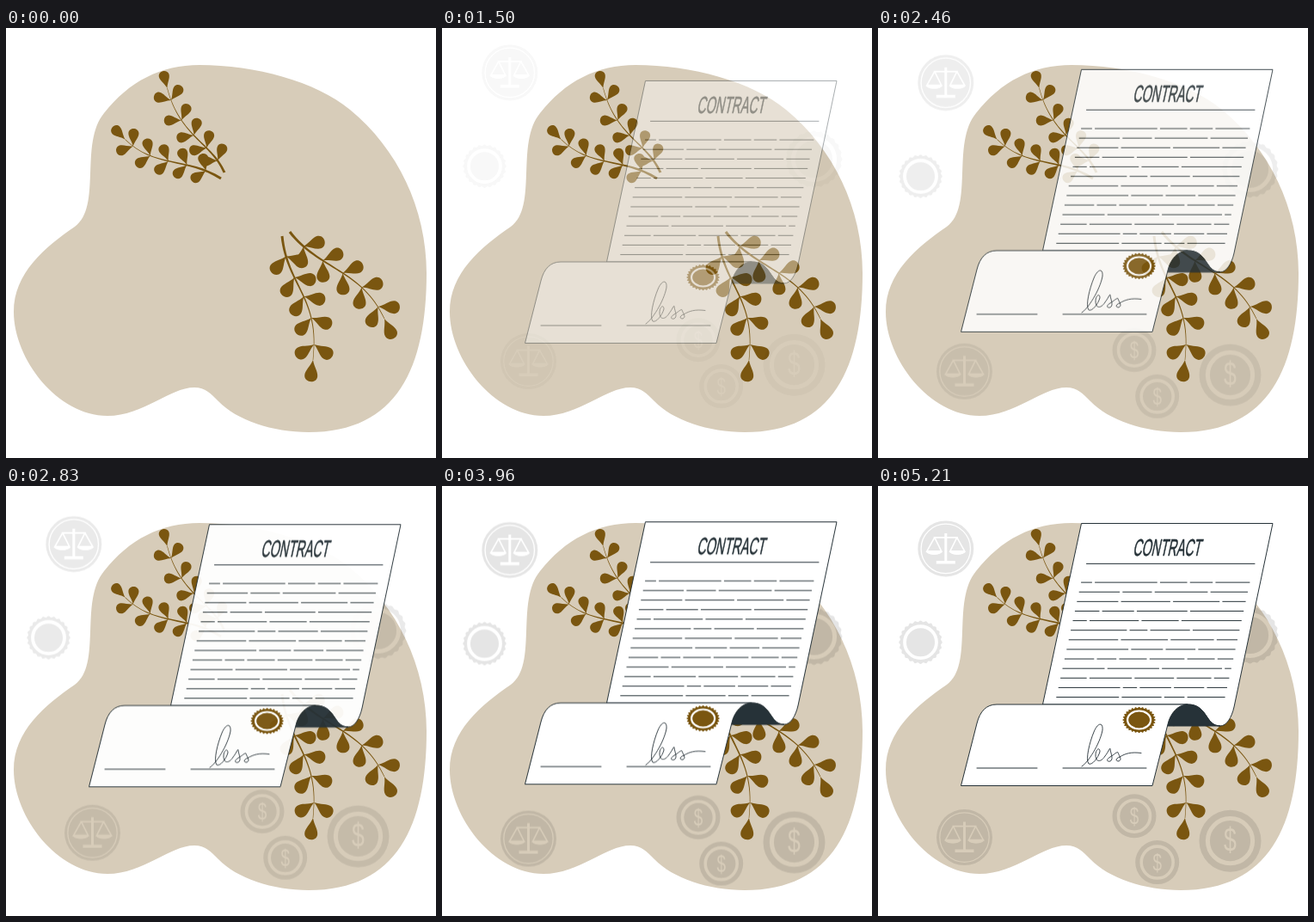
An HTML page that plays this animation: 500 by 500 pixels, repeating every 5290 ms.

```html
<!DOCTYPE html>
<html lang="en">
<head>
<meta charset="utf-8">
<title>Contract</title>
<style>
html, body { margin: 0; width: 100%; height: 100%; overflow: hidden; background: #fff; }
svg { display: block; width: 100%; height: 100%; }
.ink { fill: none; stroke: #263238; stroke-linecap: round; stroke-linejoin: round; }
.sheet { fill: #fff; stroke: #263238; stroke-linejoin: round; }
.gold { fill: #7a5610; }
text { font-family: "Liberation Sans", Arial, sans-serif; }
</style>
</head>
<body>
<svg viewBox="0 0 500 500">
  <defs id="masks"></defs>
  <path fill="#d7ccb9" d="M225 43C290 43 360 62 400 95C455 140 489 210 489 285C489 395 455 470 352 470C310 470 268 456 247 434C238 425 232 418 219 418C190 418 160 451 118 451C60 451 9 385 9 330C9 285 45 255 80 231C112 208 85 134 114 99C143 62 180 43 225 43Z"/>
  <g id="plants" class="gold"></g>
  <g id="icons" opacity="0"></g>
  <g id="paper" opacity="0">
    <path class="sheet" d="M236.5 43.5H459L414 257C411 270 405 279 398 279C380 279 384 254 360 254H191.5Z"/>
    <path fill="#263238" stroke="#263238" d="M336 279C340 264 349 254 360 254C384 254 380 279 398 279Z"/>
    <path class="sheet" d="M96.5 348.5L115 276C118.5 262 126 254 138 254H360C349 254 340 264 337 277L319 348.5Z"/>
    <text transform="translate(296 81.3) skewX(-12) scale(.518 1)" font-size="27.5" fill="#263238" stroke="#263238" stroke-width=".6">CONTRACT</text>
    <path class="ink" d="M242.5 90.4H438M115 328H185M215 328H312"/>
    <path id="lines" class="ink"/>
    <path class="ink" stroke-width=".9" d="M237 326C244 322 258 300 261 284C262 275 256 274 251 286C246 298 241 318 245 323C249 325 256 316 258 309C258 303 253 306 253 313C253 321 259 322 264 314C268 309 270 303 270 306C271 312 274 318 270 320C266 321 265 318 270 315C275 312 279 308 279 310C281 315 284 318 280 320C276 320 276 317 281 315C288 311 294 309 306 310.5"/>
    <g transform="translate(303.6 272)">
      <path id="stamp" class="gold" transform="scale(1 .79)"/>
      <ellipse rx="13.5" ry="10.5" fill="none" stroke="#fff" stroke-width="2.2"/>
    </g>
  </g>
</svg>
<script>
const $ = id => document.getElementById(id);

function add(parent, tag, attrs) {
  const el = document.createElementNS("http://www.w3.org/2000/svg", tag);
  for (const k in attrs) el.setAttribute(k, attrs[k]);
  parent.append(el);
  return el;
}

// Sprig: tapered Bezier stem, pairs of leaves around its tangent, one leaf at the tip
const LEAF = "M0 0C.3-.08.5-.3.74-.295C1.08-.27 1.08.27.74.295C.5.3.3.08 0 0Z";

function sprig(size, a, b, c, d) {
  const mix = (p, q, t) => [p[0] + (q[0] - p[0]) * t, p[1] + (q[1] - p[1]) * t];
  const leaf = (t, spread) => {
    const ab = mix(a, b, t), bc = mix(b, c, t), cd = mix(c, d, t);
    const p = mix(ab, bc, t), q = mix(bc, cd, t);
    const turn = Math.atan2(q[1] - p[1], q[0] - p[0]) * 180 / Math.PI + spread;
    add($("plants"), "path", { d: LEAF, transform: `translate(${mix(p, q, t)}) rotate(${turn}) scale(${size})` });
  };
  const len = Math.hypot(b[0] - a[0], b[1] - a[1]);
  const side = (p, w) => [p[0] - (b[1] - a[1]) / len * w, p[1] + (b[0] - a[0]) / len * w];
  add($("plants"), "path", {
    d: `M${side(a, 1.5)}C${side(b, 1)} ${side(c, .5)} ${side(d, .3)}L${side(d, -.3)}` +
       `C${side(c, -.5)} ${side(b, -1)} ${side(a, -1.5)}Z`
  });
  for (let i = 0; i < 5; i++) {
    leaf(.15 + i * .19, -56);
    leaf(.15 + i * .19, 56);
  }
  leaf(1, 0);
}
sprig(20.5, [254, 168], [240, 134], [202, 126], [187.5, 70]);
sprig(20.5, [250, 175], [211, 150], [172, 163], [138.5, 129.5]);
sprig(25.5, [321, 242], [327, 300], [366, 314], [357, 386]);
sprig(25.5, [330, 237], [363, 280], [415, 282], [440, 338]);

// Rows of text as dashes of random length
let seed = 7;
const random = () => (seed = seed * 16807 % 2147483647) / 2147483647;
let rows = "";
for (let i = 0; i < 13; i++) {
  const y = 112.1 + 11.12 * i, end = 432 - 2.4 * i;
  let x = end - 195.5;
  while (x < end) {
    let stop = x + 12 + random() * 65;
    if (stop > end - 10) stop = end;
    rows += `M${x} ${y}H${stop}`;
    x = stop + 4;
  }
}
$("lines").setAttribute("d", rows);

function scallop(r, n, depth) {
  const pts = Array.from({ length: n * 8 }, (_, i) => {
    const a = i / n / 4 * Math.PI, q = r - depth + depth * Math.cos(a * n);
    return `${q * Math.cos(a)} ${q * Math.sin(a)}`;
  });
  return `M${pts.join("L")}Z`;
}
$("stamp").setAttribute("d", scallop(19.3, 28, .9));

// Icons: dark shapes with cut-outs, drawn into masks
const ring = (m, r, width) =>
  add(m, "circle", { r, fill: "none", stroke: "#000", "stroke-width": width });

const coin = r => m => {
  add(m, "circle", { r, fill: "#fff" });
  ring(m, r * .725, r * .14);
  add(m, "text", {
    "font-size": r * 1.06, "text-anchor": "middle", y: r * .355, transform: "scale(.7 1)"
  }).textContent = "$";
};
const seal = r => m => {
  add(m, "path", { d: scallop(r, 24, .8), fill: "#fff" });
  ring(m, r * .73, r * .15);
};
const scales = m => {
  add(m, "circle", { r: 32.5, fill: "#fff" });
  ring(m, 28.7, 1.3);
  add(m, "path", { d: "M-1.5-18H1.5V14H11V17.5H-11V14H-1.5Z" });
  for (const side of [-1, 1]) {
    add(m, "path", {
      d: "M0-13H13L5 3H22L13-13M5 3C7 7 20 7 22 3", transform: `scale(${side} 1)`,
      "fill-rule": "evenodd", fill: "none", stroke: "#000", "stroke-width": 1.6
    });
    add(m, "path", { d: "M4 3H23C21 8 6 8 4 3Z", transform: `scale(${side} 1)` });
  }
};

[
  [78.8, 72.9, scales], [100.5, 408.6, scales],
  [49.5, 181.7, seal(25.3)], [432.5, 173.5, seal(33)],
  [409.5, 412.7, coin(36)], [298, 383.7, coin(25.5)], [324.7, 437.6, coin(25.5)]
].forEach(([x, y, draw], i) => {
  const box = { x: -40, y: -40, width: 80, height: 80 };
  draw(add($("masks"), "mask", { id: "m" + i, maskUnits: "userSpaceOnUse", ...box }));
  add($("icons"), "rect", {
    ...box, "fill-opacity": .1, mask: `url(#m${i})`, transform: `translate(${x} ${y})`
  });
});

// Slide in with a small overshoot, then rest until the loop ends
const LOOP = 5290;
function slide(id, from, time) {
  const rest = { opacity: 1, transform: "translateY(0px)" };
  $(id).animate([
    { opacity: 0, transform: `translateY(${from}px)`, easing: "cubic-bezier(.36,-.01,.5,1.38)" },
    { ...rest, offset: time / LOOP },
    rest
  ], { duration: LOOP, iterations: Infinity });
}
slide("paper", 30, 4440);
slide("icons", -30, 5210);
</script>
</body>
</html>
```
